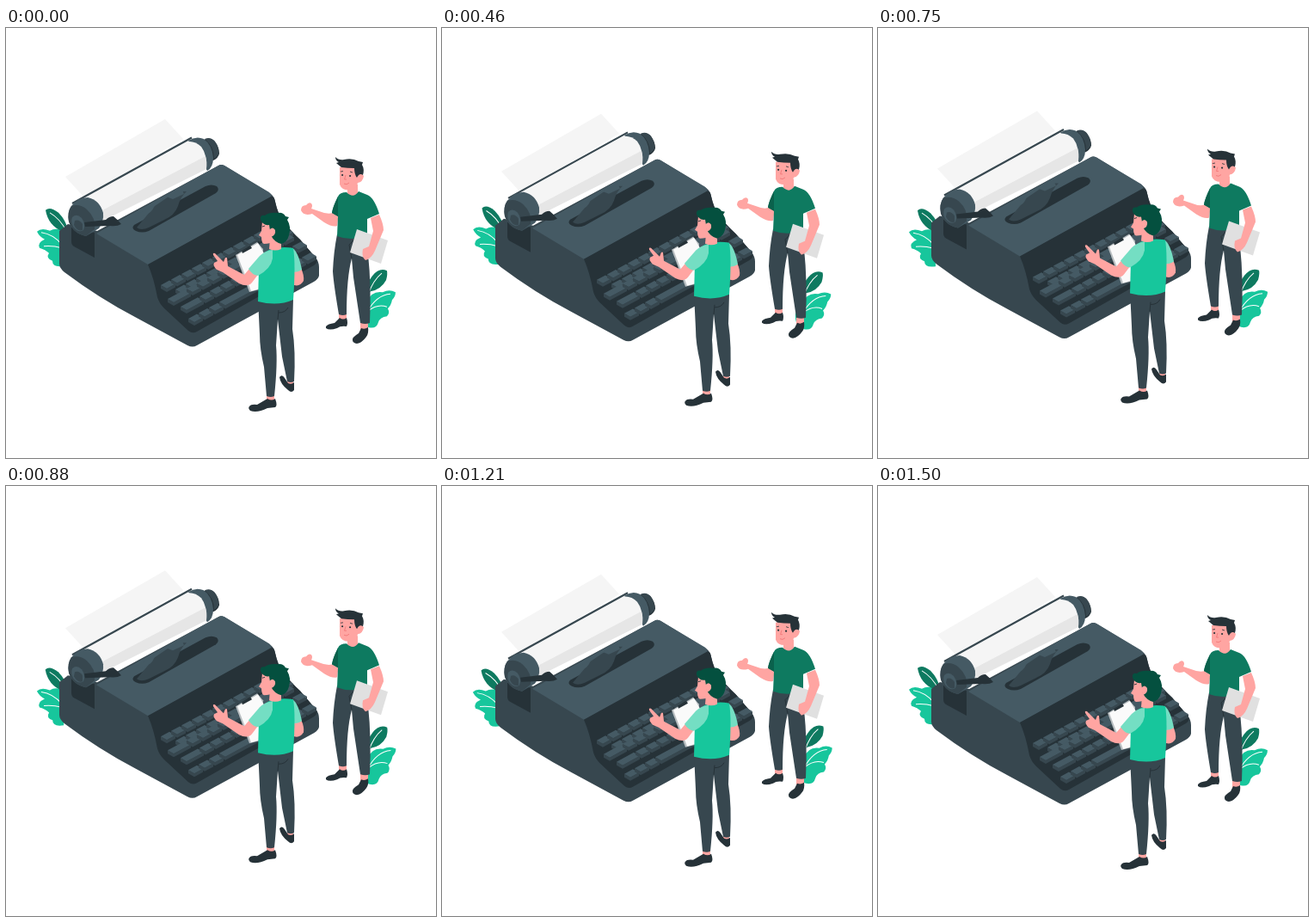
Write an HTML page with a canvas that moves like this. It is 500 by 500 pixels and loops after 1.54 s.

```html
<!DOCTYPE html>
<html lang="en">
<head>
<meta charset="utf-8">
<title>Typewriter</title>
<style>
html, body { margin: 0; width: 100%; height: 100%; overflow: hidden; background: #fff; }
canvas { display: block; width: 100vmin; height: 100vmin; }
</style>
</head>
<body>
<canvas id="stage"></canvas>
<script>
const LOOP = 1540, SWAY = 1500, LEAD = 20;
const canvas = document.getElementById('stage');
const ctx = canvas.getContext('2d');
const ratio = window.devicePixelRatio || 1;
canvas.width = canvas.height = 500 * ratio;

const INK = '#263238', SLATE = '#37474f', STEEL = '#455a64';
const GREEN = '#17c69c', MINT = '#74dec3', FOREST = '#0e7a60', PINE = '#04503f';
const SKIN = '#ffa5a2', BLUSH = '#f2797a', PAPER = '#f5f5f5', SHADE = '#e6e6e6';

const fill = (color, d) => [new Path2D(d), color, 0];
const line = (color, width, d) => [new Path2D(d), color, width];

function paint(shapes) {
  for (const [path, color, width] of shapes) {
    if (width) {
      ctx.strokeStyle = color;
      ctx.lineWidth = width;
      ctx.stroke(path);
    } else {
      ctx.fillStyle = color;
      ctx.fill(path);
    }
  }
}

const plants = [
  fill(GREEN, 'M66 236Q58 232 51 236Q41 232 36 237Q39 243 45 246Q36 250 39 256Q46 258 50 262Q46 268 54 271Q54 279 67 277Z'),
  line('#fff', 1, 'M41 238Q55 240 65 252M44 254Q54 253 65 256'),
  fill(FOREST, 'M46 212Q51 207 61 215Q70 224 73 238L66 237Q49 230 46 212Z'),
  line('#fff', 1, 'M51 215Q63 222 70 236'),
  fill(FOREST, 'M443 282Q434 278 426 288Q418 298 416 312L424 306Q436 304 442 293Q444 286 443 282Z'),
  line('#fff', 1, 'M437 285Q427 293 421 310'),
  fill(GREEN, 'M453 307Q446 303 438 307Q425 305 420 318L412 330Q411 345 422 348Q431 350 433 342Q435 336 443 335Q447 331 444 326Q448 322 449 316Q453 312 453 307Z'),
  line('#fff', 1, 'M447 309Q431 310 420 330M443 324Q432 320 421 329')
];

const body = [
  fill(SLATE, 'M62 236L72 228L106 236L247 160Q250 158 254 160L308 193Q312 196 313 202Q316 216 322 224Q330 235 342 246L360 267Q364 272 364 278V288Q363 292 358 295L222 369Q217 372 211 369L150 336Q108 314 68 284Q62 279 62 274Z'),
  fill(STEEL, 'M105 239L247 160Q250 158 254 160L306 191Q311 195 306 198L165 275Z'),
  fill(INK, 'M165 275L308 196Q312 195 313 202Q316 216 322 224Q330 235 342 246L360 267Q364 272 358 276L222 353Q217 356 212 352L184 326Q178 320 176 313Q172 291 165 275Z'),
  fill(INK, 'M76 232L103 238V267L79 254Q76 252 76 248Z'),
  fill(INK, 'M149 229L232 184Q239 181 245 184Q249 188 244 192L166 236Q158 239 151 236Q145 233 149 229Z'),
  fill(SLATE, 'M152 232L173 207L198 190L210 190Q203 196 200 207Q196 218 184 223L166 232Q157 236 152 232Z'),
  fill(STEEL, 'M150 218L170 207Q174 208 168 214L158 220ZM186 196L204 186L207 193L194 199Z')
];

// Keys: start point of each row, key lengths, and how far the row runs.
const keyRows = [
  [180, 299, [12], 305],
  [197, 304, [12], 318],
  [188, 315, [22, 12], 328],
  [203, 324, [22, 12], 340],
  [212, 338, [12, 12, 12, 60, 12], 350]
];
const keys = keyRows.flatMap(([x, y, sizes, end]) => {
  const row = [];
  for (let i = 0; x < end; i++) {
    const size = sizes[Math.min(i, sizes.length - 1)];
    const w = size - 2, h = w * .54;
    row.push(
      fill(SLATE, `M${x} ${y}l7 4l${w} ${-h}v4l${-w} ${h}l-7 -4Z`),
      fill(STEEL, `M${x} ${y}l${w} ${-h}l7 4l${-w} ${h}Z`)
    );
    x += size;
    y -= size * .54;
  }
  return row;
});

const roller = [
  fill(PAPER, 'M69 173L185 106L206 129L91 197Z'),
  fill(INK, 'M228 131Q236 126 242 131Q248 138 248 146Q247 151 241 154L232 152Z'),
  fill(SLATE, 'M231 129Q238 126 243 132Q248 139 247 147Q245 150 242 152Q242 138 231 129Z'),
  fill(STEEL, 'M212 131Q221 125 230 129Q240 136 241 151Q241 162 234 166Z'),
  fill(PAPER, 'M83 202L211 132Q220 131 227 138Q234 147 233 164L113 223Z'),
  fill(SHADE, 'M112 212L232 149Q234 155 233 164L113 224Z'),
  line(SLATE, 2.2, 'M77 204L216 127.5'),
  fill(STEEL, 'M76 207Q84 197 95 197Q109 200 113 215Q114 225 108 233L93 242Q78 239 73 225Q71 214 76 207Z'),
  fill(SLATE, 'M76 207Q86 204 94 211Q105 221 103 234L93 242Q78 239 73 225Q71 214 76 207Z'),
  fill(STEEL, 'M77 220Q82 215 88 221Q93 228 90 235Q84 239 78 231Q75 225 77 220Z'),
  fill(SLATE, 'M80 224Q85 222 89 228V235Q83 237 79 229Z'),
  fill(INK, 'M91 226L116 223Q120 219 125 219Q130 223 134 228Q129 231 121 230L92 231Z')
];

const reader = [
  fill(SKIN, 'M387 331H396V340H387ZM412 341H421V351H412Z'),
  fill(INK, 'M372 347Q374 344 382 343L388 337Q392 340 396 337Q398 343 396 347Q389 346 385 349Q376 352 372 349Z'),
  fill(INK, 'M403 363Q402 360 410 355L413 349Q417 351 421 348Q422 355 419 359Q414 366 408 367Q403 366 403 363Z'),
  fill(SLATE, 'M385 240H420L421 263Q425 301 423 343Q418 345 412 343L404 290L402 268Q396 290 396 333Q392 335 387 333Q381 298 380 283Q381 260 385 240Z'),
  line(INK, 1, 'M402 268L399 252L405 246'),
  fill(SKIN, 'M387 216L385 230Q380 232 370 226L356 216Q346 219 343 212Q343 206 349 206Q352 202 355 204Q357 206 355 210L364 213Q376 218 382 214Z'),
  fill(SKIN, 'M397 182H409V190L412 196Q404 202 395 195L397 192Z'),
  fill(FOREST, 'M396 191Q388 191 386 196Q380 208 379 215L386 219L385 242Q400 248 420 242V222L434 216Q428 197 420 194L410 190Q404 199 396 191Z'),
  fill('#0a614c', 'M386 196Q380 208 379 215L386 219Z'),
  fill(SKIN, 'M388 162L406 160L408 172Q412 166 416 172Q415 179 409 180Q408 186 402 188Q391 190 388 182Z'),
  fill(INK, 'M383 150Q387 154 393 153Q403 151 410 155L415 156L414 159Q417 164 415 171Q411 168 408 174Q405 170 405 163Q397 163 390 162L384 157L387 156Q383 154 383 150Z'),
  fill(INK, 'M390 171a1.1 1.1 0 1 0 2.2 0a1.1 1.1 0 1 0 -2.2 0M399 172a1.1 1.1 0 1 0 2.2 0a1.1 1.1 0 1 0 -2.2 0'),
  line(INK, .8, 'M389 167L392 166.5M400 167L403 168'),
  line(BLUSH, .9, 'M395 171L393.5 176H396M393 181Q396 183 399 180'),
  fill('#e0e0e0', 'M408 234L444 247L436 274L400 261Z'),
  fill(SKIN, 'M424 221L434 217Q439 228 439 235L429 259Q425 268 418 270Q413 266 415 257L422 254L427 236Z')
];

const speaker = [
  fill('#b8bec1', 'M267 264L292 249L299 257L295 304L283 307Z'),
  fill('#fafafa', 'M269 264L293 250L300 262L299 302L285 306Z'),
  fill(INK, 'M274 259L284 253L286 256L275 262Z'),
  fill(SKIN, 'M303 425H312V435H303ZM327 409H334V418H327Z'),
  fill(INK, 'M283 440Q285 437 292 438L304 431Q309 434 313 431Q316 439 313 441L304 442Q292 448 284 445Q281 442 283 440Z'),
  fill(INK, 'M318 406Q321 402 324 407L328 413Q332 415 335 412V421Q332 425 328 421Q319 414 318 406Z'),
  fill(SLATE, 'M293 315H334L333 350Q337 375 335 411Q331 413 327 411L321 382L316 339L314 369Q316 390 312 428Q308 430 303 428L300 394Q295 373 295 356Z'),
  line(INK, 1, 'M316 339L317 328M317 331Q325 331 328 325'),
  fill(SKIN, 'M333 282L343 279Q347 288 346 294Q342 301 335 299Z'),
  fill(MINT, 'M333 256Q340 260 344 281Q340 284 333 284Z'),
  fill(GREEN, 'M306 258Q320 253 334 256Q337 274 334 316Q316 324 293 318L294 280Q296 262 306 258Z'),
  fill(SKIN, 'M283 280L277 287L258 277L257 267L255 267L253 272L243 262Q240 261 241 264L246 271L242 273Q240 276 245 281L252 284L271 297Q281 302 286 296L295 284Z'),
  fill(MINT, 'M310 258Q301 259 295 265L282 280Q286 287 293 288Q308 280 310 268Z'),
  fill(SKIN, 'M307 244H320V257Q313 260 306 257Z'),
  fill(SKIN, 'M298 225H312V248Q307 251 300 251Q297 250 297 243L294 241L297 236Z'),
  fill(PINE, 'M296 223Q295 217 301 218Q306 214 316 215Q322 214 325 219L329 220L327 223Q332 231 329 241Q327 249 320 251Q312 249 308 241L306 229Q299 230 296 223Z'),
  fill(SKIN, 'M306 235Q310 230 313 235Q314 241 308 243Z'),
  line(INK, .9, 'M298 231L301 230')
];

const triangle = phase => 1 - Math.abs(2 * (phase - Math.floor(phase)) - 1);

function draw(now) {
  const time = Math.min(now % LOOP, 1500 - 2 * LEAD + 40);
  const phase = (time + LEAD) / SWAY;
  const lift = 10 * triangle(phase) - .27;
  const tilt = (2 * triangle(phase + .25) - 1) * Math.PI / 180;

  ctx.setTransform(ratio, 0, 0, ratio, 0, 0);
  ctx.fillStyle = '#fff';
  ctx.fillRect(0, 0, 500, 500);

  ctx.save();
  ctx.translate(250, 252);
  ctx.rotate(tilt);
  ctx.translate(-250, -252);
  paint(plants);
  ctx.restore();

  ctx.translate(0, -lift);
  [body, keys, roller, reader, speaker].forEach(paint);
}

let start;
function tick(now) {
  start ??= now;
  draw(now - start);
  requestAnimationFrame(tick);
}
draw(0);
requestAnimationFrame(tick);
</script>
</body>
</html>
```
